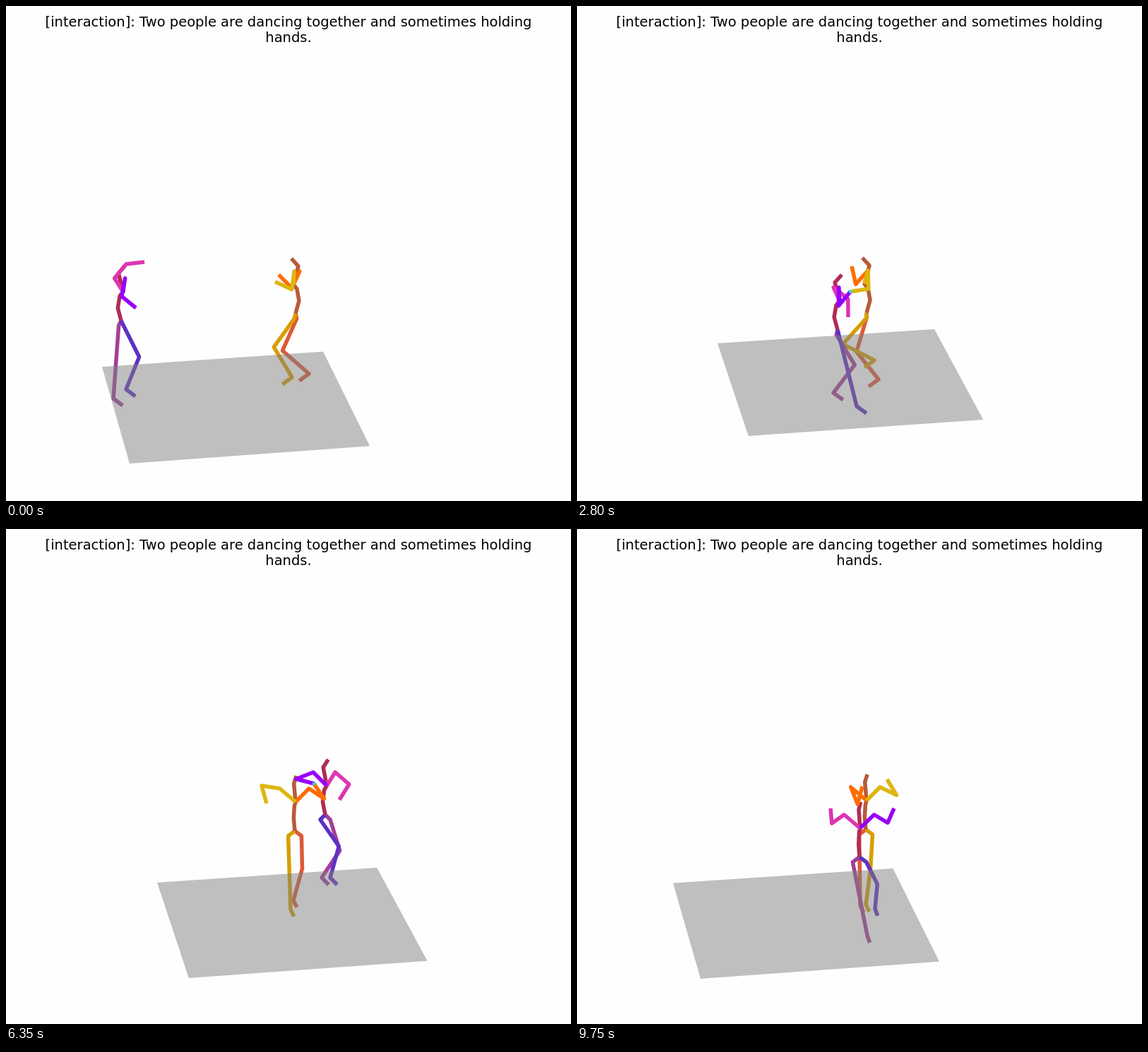
Animation of 800x700 px, one loop 9800 ms. Source, as an HTML page with a canvas:

```html
<!DOCTYPE html>
<html lang="en">
<head>
<meta charset="utf-8">
<title>Two dancers</title>
<style>
html, body { margin: 0; width: 100%; height: 100%; overflow: hidden; background: #fefefe; }
canvas, svg { position: absolute; left: 0; top: 0; display: block; }
text { font: 19.5px "DejaVu Sans", sans-serif; text-anchor: middle; fill: #000; }
</style>
</head>
<body>
<canvas id="stage" width="800" height="700"></canvas>
<svg width="800" height="700">
  <text x="400" y="29">[interaction]: Two people are dancing together and sometimes holding</text>
  <text x="400" y="51">hands.</text>
</svg>
<script>
const ctx = document.getElementById('stage').getContext('2d');
const LOOP = 9800, STEP = 50;
const LEG = 50, ARM = 26;

const keyed = (t, ...v) => ({ t, v });

// Keys: time, heading in degrees, then root, left foot, right foot, left hand, right hand
const pink = {
  legs: ['#a23e9a', '#5f30c4'], spine: '#b02c55', arms: ['#de35b0', '#9800fa'],
  rightElbow: -1,
  keys: [
    keyed(0, 20, 163, 445, 170, 542, 152, 555, 184, 427, 196, 362),
    keyed(1650, 30, 320, 430, 323, 522, 309, 538, 381, 403, 352, 364),
    keyed(2800, 10, 369, 458, 396, 566, 363, 547, 387, 404, 384, 440),
    keyed(4550, 0, 372, 406, 377, 482, 352, 504, 406, 340, 372, 339),
    keyed(6350, -45, 452, 404, 459, 493, 447, 493, 436, 360, 472, 383),
    keyed(7750, -10, 440, 475, 436, 575, 414, 570, 399, 463, 455, 401),
    keyed(9750, 75, 400, 464, 422, 537, 411, 575, 449, 395, 359, 395)
  ]
};
const gold = {
  legs: ['#dd5a37', '#d69e00'], spine: '#b75a39', arms: ['#ff6d00', '#ddb50e'],
  rightElbow: 1,
  keys: [
    keyed(0, 190, 410, 435, 405, 525, 429, 520, 381, 390, 386, 380),
    keyed(1650, 140, 409, 430, 409, 532, 399, 507, 416, 392, 359, 387),
    keyed(2800, 180, 410, 434, 421, 501, 427, 528, 387, 404, 389, 368),
    keyed(4550, 320, 410, 441, 432, 523, 414, 530, 386, 398, 429, 333),
    keyed(6350, 290, 409, 427, 403, 538, 407, 525, 369, 388, 436, 360),
    keyed(7750, 180, 411, 432, 420, 514, 407, 523, 454, 402, 377, 369),
    keyed(9750, 70, 409, 425, 409, 531, 401, 532, 439, 354, 404, 364)
  ]
};

// Keys: time, left edge, bottom edge
const floorKeys = [
  keyed(0, 136, 647), keyed(500, 160, 655), keyed(1250, 206, 628), keyed(1650, 203, 617),
  keyed(2800, 199, 608), keyed(3600, 226, 608), keyed(4550, 191, 608), keyed(5500, 212, 620),
  keyed(6350, 214, 635), keyed(7050, 212, 650), keyed(7750, 185, 667), keyed(8500, 110, 670),
  keyed(9750, 136, 636)
];

// Smooth curve through the keys
function follow(keys, t) {
  let i = 0;
  while (i < keys.length - 2 && t >= keys[i + 1].t) i++;
  const a = keys[i], b = keys[i + 1], dt = b.t - a.t, u = (t - a.t) / dt;
  const before = keys[i - 1] || a, after = keys[i + 2] || b;
  const w = u * u * (3 - 2 * u);
  return a.v.map((p, k) => {
    const q = b.v[k];
    const m = (q - before.v[k]) / (b.t - before.t) * dt;
    const n = (after.v[k] - p) / (after.t - a.t) * dt;
    return p + (q - p) * w + u * (1 - u) * (m * (1 - u) - n * u);
  });
}

const add = ([x, y], dx, dy) => [x + dx, y + dy];

// Middle joint of a limb with two equal bones; side is the signed share of the full bend
function bend(from, to, bone, side) {
  const dx = to[0] - from[0], dy = to[1] - from[1];
  const reach = Math.hypot(dx, dy) || 1;
  const out = Math.sqrt(Math.max(0, bone * bone - reach * reach / 4)) * side / reach;
  return [(from[0] + to[0]) / 2 - dy * out, (from[1] + to[1]) / 2 + dx * out];
}

function body(dancer, t) {
  const [heading, ...xy] = follow(dancer.keys, t);
  const [root, footL, footR, handL, handR] = [0, 2, 4, 6, 8].map(i => xy.slice(i, i + 2));
  const face = Math.cos(heading * Math.PI / 180);
  const side = Math.sin(heading * Math.PI / 180);
  const chest = add(root, 3 * face, -41);
  const neck = add(chest, -7 * face, -26);
  const spine = [
    root, add(root, -5 * face, -18), add(root, -2 * face, -35),
    chest, neck, add(neck, 10 * face, -11)
  ];

  const leg = (foot, s) => {
    const hip = add(root, 10 * side * s, 7);
    return [root, hip, bend(hip, foot, LEG, -face), foot, add(foot, 14 * face, 10)];
  };
  const turn = Math.max(-1, Math.min(1, 3 * face));
  const arm = (hand, s, elbow) => {
    const shoulder = add(chest, 22 * side * s - 5 * face, -19);
    return [chest, shoulder, bend(shoulder, hand, ARM, turn * elbow), hand];
  };
  return {
    dancer, root, spine, hands: [handR, handL],
    legs: [leg(footR, -1), leg(footL, 1)],
    arms: [arm(handR, -1, dancer.rightElbow), arm(handL, 1, 1)]
  };
}

function trace(pts) {
  ctx.beginPath();
  pts.forEach(([x, y]) => ctx.lineTo(x, y));
}

function line(pts, color) {
  ctx.strokeStyle = color;
  trace(pts);
  ctx.stroke();
}

// Perspective: the floor grows as it comes nearer
function drawFloor(t) {
  const [x, y] = follow(floorKeys, t);
  const near = y - 608;
  const top = y - 131 - 0.15 * near;
  const bl = x + 39 + 0.075 * (x - 136);
  trace([
    [x, top], [x + 307 + 0.155 * near, top - 20 - 0.033 * near],
    [bl + 332.5 + 0.195 * near, y - 23 - 0.045 * near], [bl, y]
  ]);
  ctx.fillStyle = 'rgba(128, 128, 128, 0.5)';
  ctx.fill();
}

// A small light where hands meet
function drawContacts(a, b) {
  ctx.fillStyle = '#20d8f0';
  for (const [x, y] of a.hands) for (const [u, v] of b.hands)
    if (Math.hypot(x - u, y - v) < 3) ctx.fillRect(x - 2, y - 2, 4, 4);
}

function draw(t) {
  ctx.clearRect(0, 0, 800, 700);
  ctx.lineWidth = 5.5;
  ctx.lineJoin = 'round';
  const pair = [pink, gold].map(d => body(d, t));
  pair.sort((a, b) => a.root[1] - b.root[1]);
  for (const { dancer, legs, spine } of pair) {
    legs.forEach((pts, i) => line(pts, dancer.legs[i]));
    line(spine, dancer.spine);
  }
  for (const { dancer, arms } of pair) arms.forEach((pts, i) => line(pts, dancer.arms[i]));
  drawContacts(...pair);
  drawFloor(t);
}

const start = performance.now();
function tick() {
  const t = (performance.now() - start) % LOOP;
  draw(Math.floor(t / STEP) * STEP);
  requestAnimationFrame(tick);
}
tick();
</script>
</body>
</html>
```
